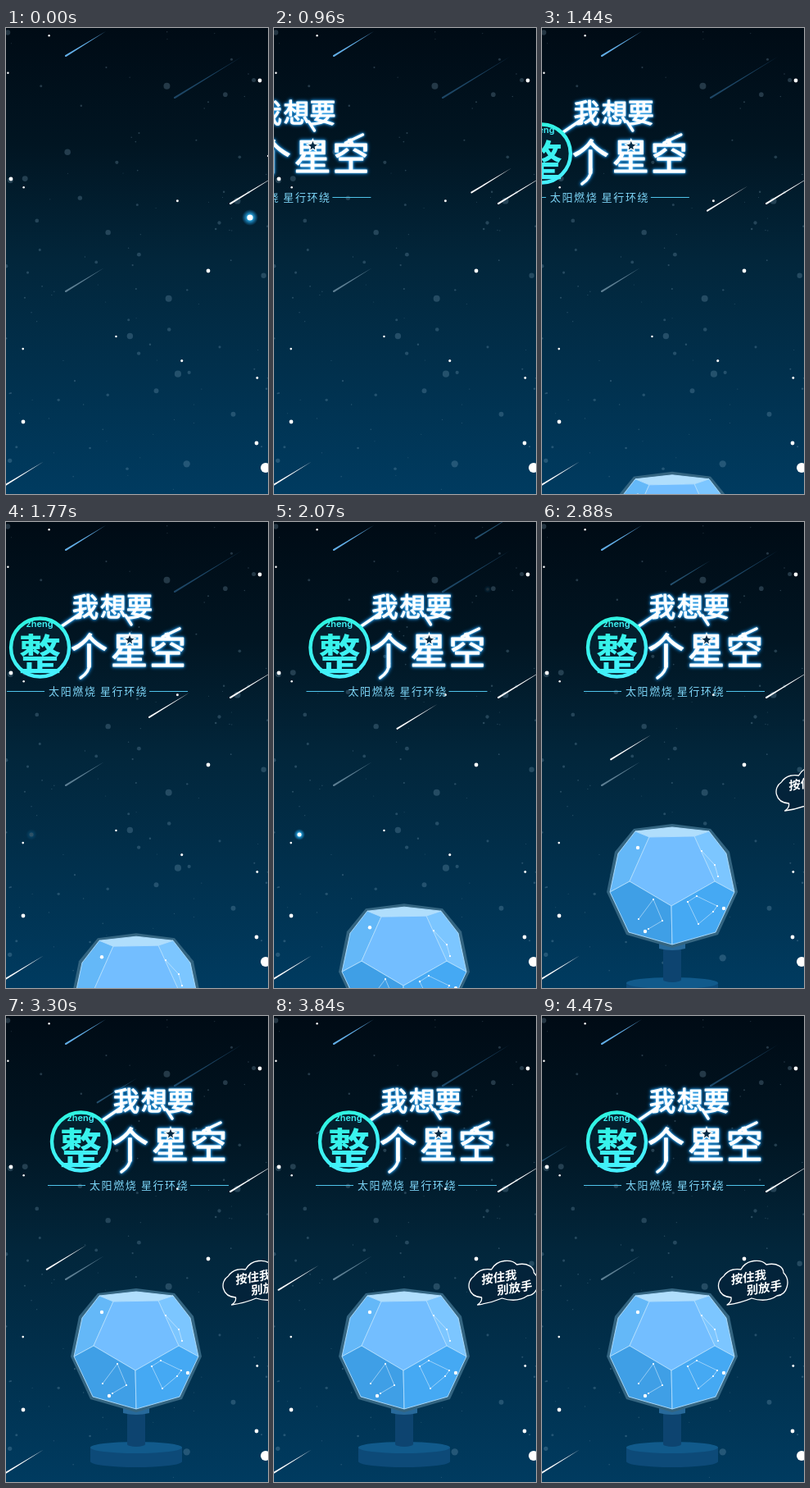
An HTML page that plays this animation: 320 px wide and 568 px high, repeating every 4.5 s.

```html
<!DOCTYPE html>
<html lang="zh-CN">
<head>
<meta charset="utf-8">
<title>星空</title>
<style>
  html, body { margin: 0; height: 100%; overflow: hidden; background: #001a2b; }
  svg { display: block; width: 320px; height: 568px; }
  text { font-family: "Noto Sans CJK SC", "Noto Sans CJK", sans-serif; }
  .neon { fill: #fff; stroke: #fff; filter: drop-shadow(0 0 1px #58c4ff) drop-shadow(0 0 2px #1489e0); }
  .neon text { font-weight: 500; stroke-width: 1.2; stroke-linejoin: round; }
  .neon path { fill: none; stroke-width: 3.4; stroke-linecap: round; }
  .neon .star { fill: #062b45; stroke-width: 1.4; }
  .faces path { stroke: #b2dfff; stroke-width: .9; stroke-linejoin: round; }
  .map { fill: none; stroke: #e4f4ff; stroke-width: .7; opacity: .75; }
</style>
</head>
<body>
<svg viewBox="0 0 320 568">
  <defs>
    <linearGradient id="night" x2="0" y2="1">
      <stop stop-color="#000b15"/>
      <stop offset=".25" stop-color="#011522"/>
      <stop offset=".5" stop-color="#02263b"/>
      <stop offset="1" stop-color="#003b60"/>
    </linearGradient>
    <linearGradient id="cyan" x2=".4" y2="1">
      <stop stop-color="#2cf5dc"/>
      <stop offset="1" stop-color="#46f0ff"/>
    </linearGradient>
    <radialGradient id="halo">
      <stop offset=".3" stop-color="#2fb4f0"/>
      <stop offset="1" stop-color="#1489d0" stop-opacity="0"/>
    </radialGradient>
  </defs>

  <rect width="320" height="568" fill="url(#night)"/>
  <g id="sky"></g>

  <g id="globe">
    <path fill="#0d4a78" d="M103 526V543A56 7 0 0 0 215 543V526Z"/>
    <ellipse cx="159" cy="526" rx="56" ry="7" fill="#115a8b"/>
    <path fill="#0d4470" d="M148 480H170V522A11 3 0 0 1 148 522Z"/>
    <path fill="#27699a" d="M143 473H175V484Q159 488 143 484Z"/>
    <path fill="#346581" d="M159 332L206 338 229 366 239 415 215 467 159 483 103 467 79 415 89 366 112 338Z"/>
    <g class="faces">
      <path fill="#b0defc" d="M159 336L204 341 186 347 131 348 114 341Z"/>
      <path fill="#64b8f8" d="M114 341L131 348 107 402 83 415 93 368Z"/>
      <path fill="#7cc6ff" d="M204 341L186 347 211 402 235 415 225 368Z"/>
      <path fill="#73beff" d="M131 348L186 347 211 402 158 432 107 402Z"/>
      <path fill="#3f9fe6" d="M83 415L107 402 158 432 159 479 106 464Z"/>
      <path fill="#45a9f3" d="M158 432L211 402 235 415 212 464 159 479Z"/>
    </g>
    <g id="maps"></g>
  </g>

  <g id="title">
    <g class="neon">
      <text y="115" x="131 165 197" font-size="32">我想要</text>
      <text y="174" x="129 178 225" font-size="45">个星空</text>
      <path d="M143 110L118 127M196 114L203 125M152 172Q152 183 141 190M241 140L262 130"/>
      <path class="star" d="M201 136L203 141 208 142 204 145 205 150 201 147 197 150 198 145 194 142 199 141Z"/>
    </g>
    <g fill="url(#cyan)" text-anchor="middle">
      <circle cx="91.5" cy="153" r="35.5" fill="#03202f" stroke="url(#cyan)" stroke-width="4.4"/>
      <text x="91" y="128" font-size="11" font-weight="600" style="font-family:Inter,sans-serif">zheng</text>
      <text x="91.5" y="181" font-size="52" font-weight="700">整</text>
    </g>
    <text x="102" y="211" font-size="13" font-weight="500" letter-spacing="1.6" fill="#7ed6f8">太阳燃烧 星行环绕</text>
    <path d="M51 206.5H97M225 206.5H272" stroke="#4fc3ea" stroke-width="1.2"/>
  </g>

  <g id="bubble">
    <path fill="#03233a" stroke="#fff" stroke-width="1.3" stroke-linejoin="round"
          d="M226 352Q232 348 231 343C214 342 211 324 222 317C228 308 238 308 243 309C250 296 268 296 274 303C288 300 295 307 295 313C304 322 300 340 287 341C276 349 262 346 256 344Q242 350 226 352Z"/>
    <g fill="#fff" font-size="14.5" font-weight="600">
      <text transform="translate(231 327) rotate(-9) skewX(-8)">按住我</text>
      <text transform="translate(250 340) rotate(-9) skewX(-8)">别放手</text>
    </g>
  </g>
</svg>

<script>
const LOOP = 4500, STEP = 30;
const $ = id => document.getElementById(id);
const sky = $('sky');

function add(parent, tag, attrs) {
  const el = document.createElementNS(parent.namespaceURI, tag);
  for (const key in attrs) el.setAttribute(key, attrs[key]);
  return parent.appendChild(el);
}
const dot = (parent, cx, cy, r, fill, opacity = 1) => add(parent, 'circle', {cx, cy, r, fill, opacity});
const move = (el, x, y) => el.setAttribute('transform', `translate(${x} ${y})`);

let seed = 11;
const random = () => (seed = seed * 16807 % 2147483647) / 2147483647;

function scatter(count, minR, maxR, fill, opacity) {
  for (let i = 0; i < count; i++) {
    const r = minR + (maxR - minR) * random() ** 2;
    dot(sky, random() * 320, random() * 568, r, fill, opacity);
  }
}

// A thin wedge: round head at the lower left, tail narrowing to a point.
function meteor(x, y, length, fill) {
  const d = `M-.5 -.9A1 1 0 0 0 .5 .9L${length} ${-length * .61}Z`;
  const el = add(sky, 'path', {d, fill});
  move(el, x, y);
  return el;
}

// A star that is brightest at `peak` and dims over `fade` ms on either side.
function glow(x, y, size, peak, fade) {
  const el = add(sky, 'g', {transform: `translate(${x} ${y}) scale(${size})`});
  dot(el, 0, 0, 10, 'url(#halo)');
  dot(el, 0, 0, 3.6, '#fff');
  return t => el.setAttribute('opacity', Math.max(0, 1 - Math.abs(t - peak) / fade));
}

function constellation(points) {
  add($('maps'), 'polyline', {points, class: 'map'});
  for (const p of points.split(' ')) dot($('maps'), ...p.split(','), 1.1, '#fff');
}

scatter(75, .5, 1.3, '#8fb0c4', .28);
scatter(40, 1.5, 4.2, '#8fb4cc', .25);
scatter(8, 1.2, 1.6, '#fff', 1);
for (const [x, y] of [[310, 64], [6, 184], [247, 296], [21, 480], [306, 506]]) dot(sky, x, y, 2.4, '#fff');
dot(sky, 317, 536, 6, '#fff');

meteor(73, 34, 49, '#62aee6');
meteor(206, 85, 82, '#1d4665');
meteor(274, 214, 60, '#fff');
meteor(73, 321, 47, '#5d7f93');
meteor(-4, 559, 50, '#fff');
const slow = meteor(0, 0, 49, '#fff');
const fast = meteor(0, 0, 48, '#24506e');
const glows = [glow(298, 231, 1, 0, 700), glow(31, 381, .7, 2070, 360), glow(261, 82, .5, 2300, 260)];

constellation('178,427 189,420 214,432 209,439 191,454 178,427');
constellation('118,448 136,424 147,450 130,460');
constellation('195,365 211,382 215,396');
for (const [x, y] of [[117, 361], [126, 463], [222, 435]]) dot($('maps'), x, y, 2.2, '#fff');

function draw(now) {
  const t = Math.floor(now % LOOP / STEP) * STEP;
  const left = end => Math.max(0, end - t);
  move($('title'), -.128 * left(2160), 0);
  move($('globe'), 0, .12 * left(3180));
  move($('bubble'), .05 * left(4290), 0);
  move(slow, 320 - .0819 * t, 156 + .0463 * t);
  move(fast, 473 - .1095 * t, -124 + .0695 * t);
  for (const setLight of glows) setLight(t);
}

const start = performance.now();
function tick() {
  draw(performance.now() - start);
  requestAnimationFrame(tick);
}
tick();
</script>
</body>
</html>
```
